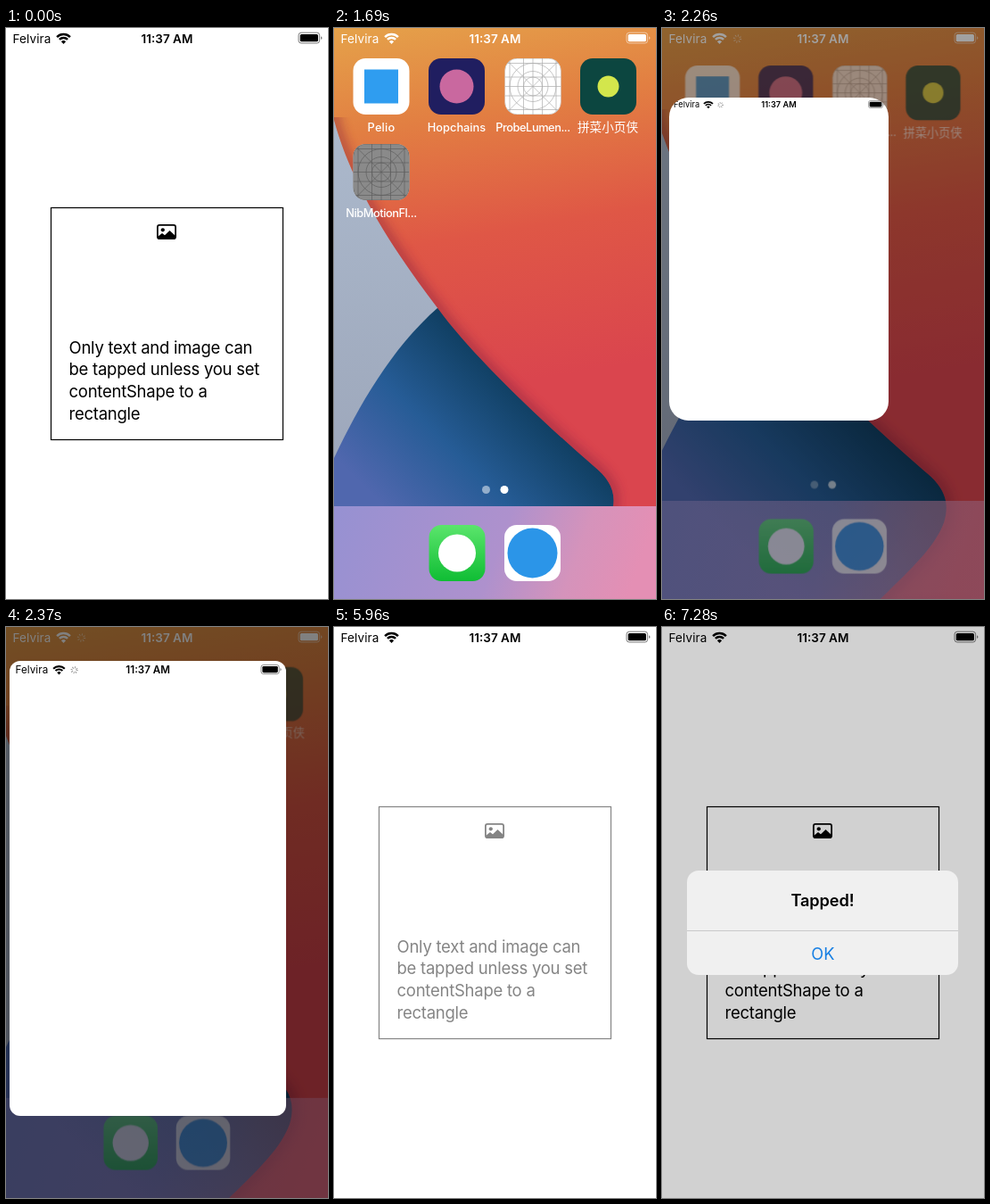
An HTML page that plays this animation: 361x640 px, repeating every 8000 ms.

```html
<!DOCTYPE html>
<html lang="en">
<head>
<meta charset="utf-8">
<title>Tap demo</title>
<style>
html, body { margin: 0; width: 100%; height: 100%; overflow: hidden; background: #fff; }
body { font-family: Inter, Roboto, "Noto Sans CJK SC", "Noto Sans CJK", sans-serif; }
svg { position: absolute; left: 0; top: 0; width: 361px; height: 640px; }

/* All poses are driven by inherited variables that change in hard steps. */
#stage {
  position: absolute; left: 0; top: 0; width: 361px; height: 640px; overflow: hidden;
  animation: timeline 8s step-end infinite;
}
@keyframes timeline {
  0%      { --zoom: 1; --open: 1; --content: 1; --alert: 0; --bar: 0; --press: 0; --spin: 0; }
  6.25%   { --zoom: 0; --open: 0; --content: 0; }
  7.75%   { --bar: .35; }
  9%      { --bar: .75; }
  10.375% { --bar: 1; }
  21.125% { --press: 1; }
  24.125% { --zoom: .02; --open: .3; }
  25.5%   { --zoom: .11; --open: .85; --spin: 1; }
  26.875% { --zoom: .34; --open: 1; }
  28.25%  { --zoom: .614; }
  29.625% { --zoom: .83; }
  31.125% { --zoom: .95; }
  32.375% { --zoom: .99; --press: 0; }
  33.75%  { --zoom: 1; --spin: 0; }
  74.5%   { --content: .48; }
  75.875% { --content: .82; }
  77.375% { --content: 1; }
  88.125% { --alert: .35; }
  89.5%   { --alert: .85; }
  91%     { --alert: 1; }
  100%    { --zoom: 1; --open: 1; --content: 1; --alert: 1; --bar: 1; --press: 0; --spin: 0; }
}

.wallpaper, .icons, .alert { transform-origin: 180.5px 320px; }
.wallpaper { transform: scale(calc(1 + .065 * var(--zoom))); }
.icons { transform: scale(calc(1 - .046 * var(--zoom))); opacity: calc(1 - .5 * var(--zoom)); }
.dock { transform: translateY(calc(-9.8px * var(--zoom))); opacity: calc(1 - .6 * var(--zoom)); }
.bar { opacity: var(--bar); color: #fff; }
.dim { opacity: calc(.6 * var(--zoom)); }
.press { opacity: calc(.46 * var(--press)); }
.spin { opacity: calc(.5 * var(--spin)); }
.labels { font-size: 12.8px; font-weight: 500; fill: #fff; text-anchor: middle; }
.tight { letter-spacing: -.45px; }
.status { font-size: 13.5px; fill: currentColor; }

#window {
  --h: calc(63px + 577px * var(--zoom) * (.6 + .4 * var(--zoom)));
  position: absolute; overflow: hidden; background: #fff; color: #000;
  left: calc(21.5px * (1 - var(--zoom)));
  top: calc(161.5px + 158.5px * var(--zoom) - var(--h) / 2);
  width: calc(63px + 298px * var(--zoom));
  height: var(--h);
  border-radius: calc((1 - var(--zoom)) * (14px + 68px * var(--zoom)));
  opacity: var(--open);
}
#window svg { transform-origin: 0 0; transform: scale(calc((63 + 298 * var(--zoom)) / 361)); }
.content { opacity: var(--content); font-size: 18.5px; letter-spacing: -.25px; }
.shade { opacity: calc(.18 * var(--alert)); }
.alert {
  opacity: var(--alert); transform: scale(calc(1.15 - .15 * var(--alert)));
  font-size: 18.2px; text-anchor: middle;
}
</style>
</head>
<body>
<div id="stage">
  <svg viewBox="0 0 361 640">
    <defs>
      <linearGradient id="grey" x2="0" y2="1">
        <stop stop-color="#afbdd0"/><stop offset="1" stop-color="#98a1b5"/>
      </linearGradient>
      <linearGradient id="red" gradientUnits="userSpaceOnUse" x1="0" y1="0" x2="70" y2="420">
        <stop stop-color="#e5a24a"/><stop offset=".28" stop-color="#e27f42"/>
        <stop offset=".6" stop-color="#df5746"/><stop offset="1" stop-color="#da454e"/>
      </linearGradient>
      <linearGradient id="blue" gradientUnits="userSpaceOnUse" x1="210" y1="410" x2="70" y2="550">
        <stop stop-color="#103f62"/><stop offset=".5" stop-color="#265c96"/><stop offset="1" stop-color="#5067ae"/>
      </linearGradient>
      <linearGradient id="dockFill" x2="1" y2=".12">
        <stop stop-color="#9691d2"/><stop offset=".55" stop-color="#ae91cd"/>
        <stop offset=".8" stop-color="#d593bb"/><stop offset="1" stop-color="#e48fb4"/>
      </linearGradient>
      <linearGradient id="green" x2="0" y2="1">
        <stop stop-color="#5be56c"/><stop offset="1" stop-color="#0fbd34"/>
      </linearGradient>
      <filter id="soft" x="-20%" y="-20%" width="140%" height="140%"><feGaussianBlur stdDeviation="6"/></filter>
      <path id="redShape" d="M0 103C18 170 60 241 117 315C150 360 215 425 290 490C310 506 318 522 311 545C300 575 270 600 230 640H361V0H0Z"/>
      <clipPath id="redClip"><use href="#redShape"/></clipPath>
      <clipPath id="tileClip"><rect width="63" height="63" rx="14"/></clipPath>
      <rect id="tile" width="63" height="63" rx="14"/>
      <g id="blank">
        <use href="#tile" fill="#fff"/>
        <g clip-path="url(#tileClip)" fill="none" stroke="#adadad" stroke-width=".7">
          <path d="M5.5 0V63M21 0V63M31.5 0V63M42 0V63M57.5 0V63M0 5.5H63M0 21H63M0 31.5H63M0 42H63M0 57.5H63M0 0L63 63M63 0L0 63"/>
          <circle cx="31.5" cy="31.5" r="10.5"/><circle cx="31.5" cy="31.5" r="17"/><circle cx="31.5" cy="31.5" r="26"/>
          <use href="#tile"/>
        </g>
      </g>
      <g id="status" class="status">
        <text x="7.5" y="16.7" letter-spacing=".1">Felvira</text>
        <g fill="none" stroke="currentColor" stroke-width="2.5">
          <path d="M57.1 10.1A10.5 10.5 0 0 1 71.9 10.1M59.9 12.9A6.5 6.5 0 0 1 69.1 12.9"/>
        </g>
        <path d="M64.5 18L61.9 15.2A3.7 3.7 0 0 1 67.1 15.2Z"/>
        <circle class="spin" cx="84.5" cy="12" r="3.4" fill="none" stroke="currentColor" stroke-width="2.6" stroke-dasharray=".9 1.77"/>
        <text x="180.5" y="16.7" font-weight="600" text-anchor="middle">11:37 AM</text>
        <rect x="328" y="5.2" width="23.6" height="11.8" rx="3" fill="none" stroke="currentColor" opacity=".5"/>
        <rect x="329.7" y="6.9" width="20.2" height="8.4" rx="1.6"/>
        <path d="M353 9.2Q356 11.1 353 13Z" opacity=".5"/>
      </g>
    </defs>

    <g class="wallpaper">
      <rect width="361" height="640" fill="url(#grey)"/>
      <path d="M117 313C64 359 27 425 0 482V640H361V540L290 440Z" fill="url(#blue)"/>
      <use href="#redShape" fill="url(#red)"/>
      <g clip-path="url(#redClip)">
        <use href="#redShape" fill="none" stroke="#8a2440" stroke-width="12" opacity=".5" filter="url(#soft)" clip-path="url(#inner)"/>
        <clipPath id="inner"><path d="M0 100H340V640H0Z"/></clipPath>
      </g>
    </g>
    <rect class="dock" y="536" width="361" height="120" fill="url(#dockFill)"/>
    <g class="icons">
      <use href="#tile" x="21.5" y="34" fill="#fff"/>
      <rect x="34" y="46.5" width="38" height="38" fill="#2f9df0"/>
      <use href="#tile" x="106" y="34" fill="#201e60"/>
      <circle cx="137.5" cy="65.5" r="19" fill="#c9689f"/>
      <use href="#blank" x="191.5" y="34"/>
      <use href="#tile" x="276" y="34" fill="#0c4640"/>
      <circle cx="307.5" cy="65.5" r="12" fill="#d3e64c"/>
      <use href="#blank" x="21.5" y="130"/>
      <use class="press" href="#tile" x="21.5" y="130"/>
      <g class="labels">
        <text x="53" y="115.5" letter-spacing=".2">Pelio</text>
        <text x="137.5" y="115.5">Hopchains</text>
        <text class="tight" x="223" y="115.5">ProbeLumen...</text>
        <text x="307" y="116" font-size="13.6">拼菜小页侠</text>
        <text class="tight" x="53" y="211.5">NibMotionFl...</text>
      </g>
      <g fill="#fff">
        <circle cx="170.5" cy="517.5" r="4.5" opacity=".5"/>
        <circle cx="191" cy="517.5" r="4.5"/>
      </g>
      <use href="#tile" x="106.5" y="557" fill="url(#green)"/>
      <circle cx="138" cy="588.5" r="21" fill="#fff"/>
      <use href="#tile" x="191" y="557" fill="#fff"/>
      <circle cx="222.5" cy="588.5" r="28" fill="#2b95e8"/>
    </g>
    <use class="bar" href="#status"/>
    <rect class="dim" width="361" height="640"/>
  </svg>

  <div id="window">
    <svg viewBox="0 0 361 640">
      <use href="#status"/>
      <g class="content">
        <rect x="50.5" y="201.5" width="260" height="260" fill="none" stroke="#000" stroke-width="1.2"/>
        <rect x="169.9" y="220.9" width="20.2" height="15.2" rx="2.2" fill="none" stroke="#000" stroke-width="1.8"/>
        <circle cx="175.8" cy="226.3" r="2.1"/>
        <path d="M170 234L175 230L178 232.3L183.5 227L190 233V236H170Z"/>
        <text x="70.5" y="364.5">Only text and image can</text>
        <text x="70.5" y="389.3">be tapped unless you set</text>
        <text x="70.5" y="414.1">contentShape to a</text>
        <text x="70.5" y="438.9">rectangle</text>
      </g>
      <rect class="shade" width="361" height="640"/>
      <g class="alert">
        <rect x="28" y="273" width="304" height="117" rx="13" fill="#f0f0f0"/>
        <path d="M28 340.5H332" stroke="#c9c9ca"/>
        <text x="180" y="313.2" font-weight="600" letter-spacing="-.1">Tapped!</text>
        <text x="180.3" y="372.5" fill="#177fe3">OK</text>
      </g>
    </svg>
  </div>
</div>
</body>
</html>
```
